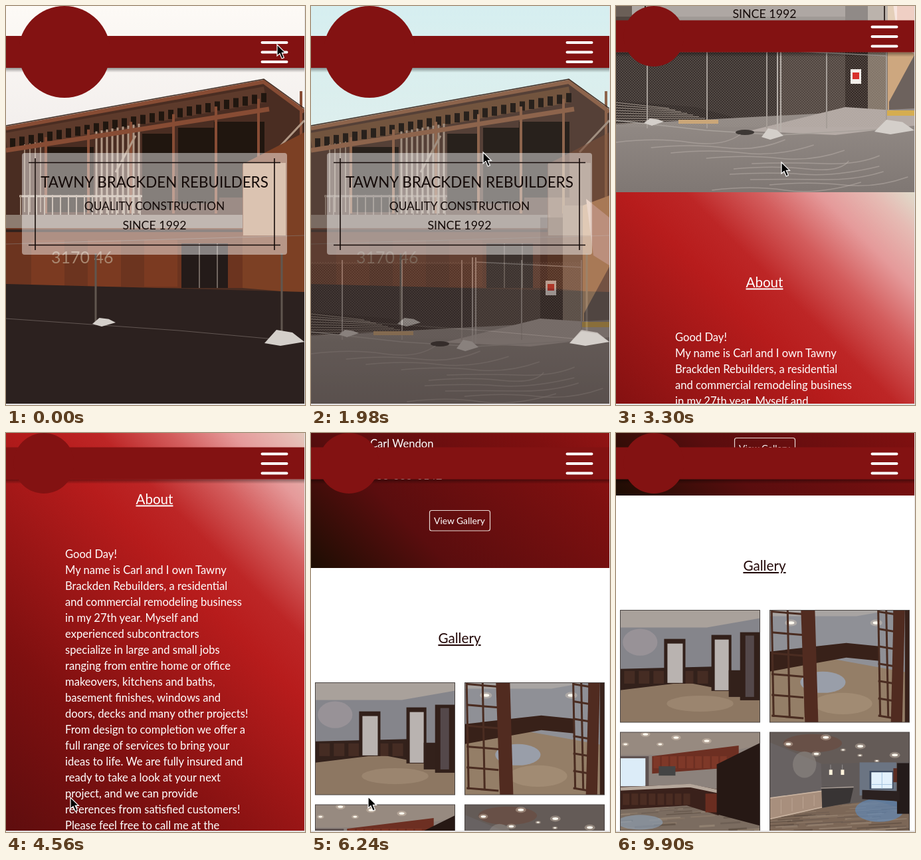
Recreate the animation shown at these times as an HTML page. Size 450x600 px, loop 9.96 s.

```html
<!DOCTYPE html>
<html lang="en">
<head>
<meta charset="utf-8">
<title>Builder site walkthrough</title>
<style>
html, body { margin: 0; width: 100%; height: 100%; overflow: hidden; background: #fff; }
svg { display: block; width: 450px; height: 600px; }
text { font-family: Lato, "Open Sans", sans-serif; }
.mid { text-anchor: middle; }
.u { text-decoration: underline; }
</style>
</head>
<body>
<svg id="stage" viewBox="0 0 450 600" xmlns="http://www.w3.org/2000/svg"></svg>
<script>
const LOOP = 9960, HERO = 598, ABOUT = 885;
const RED = '#831212', INK = '#140a08';

// Markup helpers
const rect = (x, y, w, h, fill, more = '') =>
  `<rect x="${x}" y="${y}" width="${w}" height="${h}" fill="${fill}" ${more}/>`;
const poly = (pts, fill) => `<polygon points="${pts}" fill="${fill}"/>`;
const line = (d, stroke, w = 1, more = '') =>
  `<path d="${d}" fill="none" stroke="${stroke}" stroke-width="${w}" ${more}/>`;
const oval = (x, y, rx, ry, fill, alpha = 1) =>
  `<ellipse cx="${x}" cy="${y}" rx="${rx}" ry="${ry}" fill="${fill}" opacity="${alpha}"/>`;
const label = (x, y, size, fill, str, cls = '') =>
  `<text x="${x}" y="${y}" font-size="${size}" fill="${fill}" class="${cls}">${str}</text>`;
const stop = ([at, color, alpha = 1]) =>
  `<stop offset="${at}" stop-color="${color}" stop-opacity="${alpha}"/>`;
const fade = (id, ...stops) =>
  `<linearGradient id="${id}" x2="0" y2="1">${stops.map(stop).join('')}</linearGradient>`;
const each = (n, fn) => Array.from({ length: n }, (_, i) => fn(i)).join('');

function random(seed) {
  return () => (seed = (seed * 16807) % 2147483647) / 2147483647;
}

// Building front shared by both hero photos
const roofY = x => 183 - x * .18;
const upright = (x, top, bottom, color, w) => line(`M${x} ${roofY(x) + top}V${bottom}`, color, w);

function house(c) {
  return rect(0, 0, 450, HERO, c.sky) +
    poly('0,183 388,113 449,158 449,440 0,440', c.wall) +
    rect(62, 212, 70, 98, c.hole) +
    each(3, i => rect(205 + i * 54, 192 - i * 9, 48 + i * 14, 114, c.hole)) +
    line('M0 203L390 133', c.trim, 24) +
    each(28, i => rect(6 + i * 14, roofY(6 + i * 14) + 17, 8, 14, c.hole)) +
    each(9, i => upright(136 + i * 8, 30, 312, c.stud, 3)) +
    each(5, i => upright(28 + i * 8, 30, 310, c.stud, 1.5)) +
    each(7, i => upright(60 + i * 64, 25, 312, c.beam, 4)) +
    line('M0 217L396 155', c.beam, 7) +
    line('M165 250L195 195M404 220L449 172', c.stud, 3) +
    line('M0 184L388 114L449 159', c.beam, 6) +
    line('M0 180L388 110L449 154', '#3b2a22', 1.5) +
    rect(0, 314, 360, 20, c.band);
}

// Lumpy sandbag standing at (x, y)
const bag = (x, y, w, h) =>
  poly(`${x},${y} ${x + w * .3},${y - h} ${x + w * .7},${y - h * .8} ${x + w},${y - 2} ${x + w * .4},${y + 4}`, '#d4cfca');

function framePhoto() {
  return house({ sky: 'url(#skyA)', wall: '#4a2d22', trim: '#5d3a2b', hole: '#20160f',
      stud: '#b19885', beam: '#874c34', band: '#8d7c70' }) +
    line('M20 286H205', '#c0ad9d', 3) + each(16, i => line(`M${22 + i * 12} 284V314`, '#ab9686', 2)) +
    rect(0, 334, 360, 90, '#6c341f') + line('M0 338H360', '#33221d', 4) +
    each(3, i => rect(38 + i * 85, 352, 50, 70, '#7b3a21')) +
    poly('356,238 449,190 449,432 356,424', '#7c4024') + rect(357, 236, 64, 109, '#bd9270') +
    rect(264, 357, 70, 67, '#241b19') + line('M291 357V424M318 357V424', '#8a8078', 1.5) +
    label(68, 387, 25, '#a98770', '3170 46') +
    poly('0,418 449,430 449,598 0,598', '#2c211f') +
    line('M0 470L260 488L449 505M0 358L449 345', '#857a75', 1, 'opacity=".6"') +
    line('M135 372V476M415 372V500', '#60564f', 3) +
    bag(130, 478, 35, 9) + bag(389, 507, 60, 20);
}

function donePhoto() {
  const rnd = random(7);
  return house({ sky: 'url(#skyB)', wall: '#5f5149', trim: '#83694f', hole: '#302a28',
      stud: '#94887d', beam: '#927960', band: '#6b5f57' }) +
    rect(0, 334, 345, 166, '#514640') + rect(0, 388, 245, 110, '#3a312e') +
    poly('0,460 120,470 180,486 100,496 0,494', '#302825') +
    each(9, i => line(`M0 ${463 + i * 4}L${80 + i * 9} ${472 + i * 2.5}`, '#a1958b', 1)) +
    rect(345, 318, 34, 155, '#342925') + rect(379, 300, 30, 175, '#837568') +
    poly('409,300 449,285 449,480 409,480', '#cda77f') + poly('414,290 449,318 449,390 425,375', '#efcfc4') +
    poly('411,462 449,392 449,476 411,476', '#6d625d') +
    poly('0,496 449,472 449,598 0,598', 'url(#road)') +
    poly('200,506 345,470 449,477 449,498 330,512', '#b5aba6') +
    rect(407, 475, 42, 8, '#d5ad50') + rect(0, 385, 407, 115, 'url(#mesh)') +
    each(5, i => line(`M${47 + i * 90} 382V502`, '#a59d97', 2)) +
    line('M243 378V508M248 378V508', '#b8b1ab', 2) +
    line('M248 385L408 393M0 490L136 505L245 512L408 503', '#a9a29c', 1.5) +
    rect(353, 413, 16, 22, '#f3eeea') + rect(356, 418, 10, 10, '#d8312c') +
    rect(94, 489, 60, 6, '#caa678') + bag(42, 494, 30, 7) + bag(219, 515, 33, 13) + bag(389, 507, 60, 18) +
    oval(194, 508, 14, 4, '#3d3835') +
    each(10, i => {
      const x = rnd() * 250, y = 515 + i * 8;
      return line(`M${x} ${y + 8}q60 ${-8 * rnd()} 110 0t${60 + 60 * rnd()} -12`, '#bcb2ac', 1.5, 'opacity=".5"');
    });
}

// Interior photos
const room = (wall, ceil, floor, top, low) => rect(0, 0, 210, 168, wall) +
  poly(`0,0 210,0 210,${top - 14} 130,${top} 0,${top}`, ceil) +
  poly(`0,${low + 4} 100,${low} 210,${low + 20} 210,168 0,168`, floor);
const lampRow = (n, x, y, dx, dy, r) => each(n, i =>
  oval(x + i * dx, y + i * dy, r * 1.8, r, '#e8d8c4', .35) + oval(x + i * dx, y + i * dy, r, r * .45, '#fffaf0'));
const cells = (n, x, y, dx, w, h, fill) => each(n, i => rect(x + i * dx, y, w, h, fill));

// Random floor boards, longer and thicker towards the viewer
function boards(w, top, bottom, n) {
  const rnd = random(97), tones = ['#94806d', '#54453b', '#a3917f', '#65574e'];
  return each(n, i => {
    const k = (i / n) ** 1.5, len = w * (.1 + .16 * rnd());
    return line(`M${w * (rnd() - .1)} ${top + (bottom - top) * k}l${len} ${-len * .06}`,
      tones[i % 4], 1 + 4 * k, 'opacity=".55"');
  });
}

const doorway = (x, y, w, h) => rect(x, y, w, h, '#32201a') + rect(x + 5, y + 7, w - 9, h - 8, '#b9b3b0');
const hall = () => room('#85858b', '#a9a19b', '#8d7762', 26, 106) +
  oval(30, 48, 26, 20, '#a59ca0', .6) + oval(120, 140, 50, 12, '#a58f78', .6) +
  poly('0,88 160,84 160,120 98,108 0,120', '#33211b') + cells(6, 6, 91, 22, 16, 19, '#452c23') +
  doorway(66, 43, 32, 67) + doorway(137, 37, 30, 84) +
  rect(163, 90, 18, 40, '#33211b') + rect(180, 33, 30, 102, '#32201a') + rect(188, 38, 13, 92, '#54484a');

const panes = (x, w, rows) =>
  each(rows + 1, i => line(`M${x} ${2 + i * 156 / rows}l${w} 4`, '#4a2c21', 3)) +
  each(3, i => line(`M${x + i * w / 2} 0l3 160`, '#4a2c21', 3));
const doors = () => room('#8f9096', '#a8a4a2', '#947e67', 9, 74) +
  oval(80, 108, 34, 16, '#9aa4b6', .85) + oval(110, 140, 44, 16, '#a18b73') +
  poly('0,62 115,49 165,54 165,76 115,71 0,92', '#382119') + lampRow(2, 32, 19, 128, 0, 5) +
  panes(3, 48, 5) + poly('47,0 68,0 73,168 53,168', '#512b20') +
  panes(163, 24, 6) + poly('186,0 203,0 199,168 182,168', '#502b20') + rect(203, 0, 7, 168, '#39221b');

const kitchen = () => room('#8c827c', '#978a80', '#7b6c60', 34, 110) + boards(210, 114, 166, 40) +
  lampRow(3, 38, 3, 46, 5, 4) + lampRow(2, 8, 18, 52, 0, 3) +
  rect(0, 36, 43, 48, '#5d5150') + rect(0, 39, 38, 42, '#dcecf8') +
  poly('48,36 178,20 178,52 48,62', '#6d2f22') + cells(9, 50, 36, 12.5, 10, 18, '#7e3828') +
  rect(58, 51, 25, 14, '#444') + poly('0,82 105,78 148,86 148,125 100,110 0,116', '#3a211b') +
  line('M0 85L105 80L148 89', '#b5a79b', 5) + cells(8, 4, 92, 13, 10, 17, '#4a2c22') +
  rect(128, 92, 18, 28, '#6a2d20') + oval(30, 135, 34, 11, '#90a5bd', .6) +
  poly('145,48 210,16 210,140 145,123', '#261814');

const basement = () => rect(0, 0, 407, 305, '#605a59') +
  poly('0,0 407,0 407,80 153,86 0,24', '#645b57') + oval(130, 30, 80, 25, '#6d4638', .5) +
  poly('0,22 153,85 156,190 0,215', '#686262') + oval(108, 88, 32, 36, '#9b948e', .45) +
  rect(258, 82, 100, 90, '#6b7482') + rect(285, 105, 65, 50, '#3e4c62') +
  rect(290, 109, 57, 44, '#e3f1fc') + line('M319 109V153M290 142H347', '#a9c6e0', 2) +
  poly('0,238 156,203 300,186 407,218 407,305 0,305', '#7c6757') + boards(407, 196, 300, 110) +
  oval(312, 212, 66, 32, '#5f8fc6', .6) +
  rect(350, 98, 17, 38, '#5b2c22') + rect(360, 84, 47, 138, '#241b1a') +
  poly('0,180 156,159 156,205 0,240', '#a88f7d') + line('M0 181L156 160M0 239L156 204', '#c9b3a0', 3) +
  each(5, i => line(`M${14 + i * 30} ${187 - i * 4}v${42 - i * 3}`, '#c1aa97', 1.5)) +
  poly('154,150 242,148 232,192 156,206', '#383434') + line('M153 152L242 149', '#a79c94', 3) +
  poly('265,157 367,160 367,188 265,182', '#2b2120') +
  each(2, i => line(`M${179 + i * 32} 88V103`, '#bbb') + rect(175 + i * 32, 102, 9, 14, '#fff3dc')) +
  lampRow(3, 166, 14, 94, 24, 8) + lampRow(2, 64, 32, 76, 27, 7) + lampRow(3, 213, 48, 46, 15, 4);

const symbol = (id, w, h, body) =>
  `<symbol id="${id}" viewBox="0 0 ${w} ${h}" preserveAspectRatio="xMidYMid slice">${body}</symbol>`;
const photo = (id, x, y, w, h, more = '') =>
  `<use href="#${id}" x="${x}" y="${y}" width="${w}" height="${h}" ${more}/>`;

const about = `Good Day!
My name is Carl and I own Tawny
Brackden Rebuilders, a residential
and commercial remodeling business
in my 27th year. Myself and
experienced subcontractors
specialize in large and small jobs
ranging from entire home or office
makeovers, kitchens and baths,
basement finishes, windows and
doors, decks and many other projects!
From design to completion we offer a
full range of services to bring your
ideas to life. We are fully insured and
ready to take a look at your next
project, and we can provide
references from satisfied customers!
Please feel free to call me at the
number below with any questions.

Carl Wendon

555-555-0142`.split('\n');

// 45 degree gradient across the About section, from its top right corner
const reach = (450 + ABOUT) / 2;
const redStops = [[0, '#e0dccb'], [.05, '#e6bab3'], [.11, '#e59a9a'], [.18, '#d35c5c'], [.26, '#bd2626'],
  [.33, '#b71c1c'], [.6, '#7f1010'], [.84, '#5a0d0e'], [1, '#1c0d03']];

const defs = '<defs>' +
  fade('skyA', [0, '#fdfaf6'], [.3, '#f3efed']) + fade('skyB', [0, '#b8e6ec'], [.3, '#ccefee']) +
  fade('road', [0, '#958d88'], [1, '#7f7773']) + fade('shade', [0, '#000', .4], [1, '#000', 0]) +
  `<linearGradient id="red" gradientUnits="userSpaceOnUse" x1="450" y1="${HERO}" x2="${450 - reach}" y2="${HERO + reach}">` +
  redStops.map(stop).join('') + '</linearGradient>' +
  '<pattern id="mesh" width="4" height="4" patternUnits="userSpaceOnUse">' +
  line('M0 0L4 4M4 0L0 4', '#a59c95', .5, 'opacity=".5"') + '</pattern>' +
  symbol('hall', 210, 168, hall()) + symbol('doors', 210, 168, doors()) +
  symbol('kitchen', 210, 168, kitchen()) + symbol('basement', 407, 305, basement()) + '</defs>';

const card = rect(24, 221, 399, 153, '#fff', 'rx="4" fill-opacity=".45"') +
  line('M34 235.5H413M34 359.5H413M44 229V367M404 229V367', INK, 1.6) +
  label(223.5, 273, 22.4, INK, 'TAWNY BRACKDEN REBUILDERS', 'mid') +
  label(223.5, 306.5, 17.3, INK, 'QUALITY CONSTRUCTION', 'mid') +
  label(223.5, 335.5, 17.8, INK, 'SINCE 1992', 'mid');

const thumbs = ['hall', 'doors', 'kitchen', 'basement'].map((id, i) => {
  const x = 6.5 + (i % 2) * 225, y = 1655.5 + (i >> 1) * 183.5;
  return photo(id, x, y, 210, 168.5) + rect(x, y, 210, 168.5, 'none', 'stroke="#4a4442"');
}).join('');

const page = rect(0, 0, 450, 2100, '#fff') + framePhoto() + `<g id="next">${donePhoto()}</g>` + card +
  rect(0, HERO, 450, ABOUT, 'url(#red)') +
  label(223.5, 740.5, 20.6, '#fff', 'About', 'mid u') +
  about.map((s, i) => label(89, 822 + i * 24, 16.6, '#fff', s)).join('') +
  rect(178.5, 1396.5, 91, 30.5, 'none', 'rx="3" stroke="#e8d9d4" stroke-width="1.2"') +
  label(223.5, 1416.5, 13.8, '#fff', 'View Gallery', 'mid') +
  label(223.5, 1596, 20.7, '#220606', 'Gallery', 'mid u') + thumbs;

const round = 'stroke-linecap="round" stroke-linejoin="round"';
const lightbox = rect(0, 0, 450, 600, '#fff', 'fill-opacity=".7"') +
  photo('kitchen', 21, 185, 407, 305) + photo('basement', 21, 185, 407, 305, 'id="shot"') +
  [22, 389.5].map(x => rect(x, 185, 38, 305, '#fff', 'fill-opacity=".42"')).join('') +
  rect(389.5, 186, 38, 37, '#fff', 'fill-opacity=".55"') +
  rect(21.5, 185.5, 406, 304.5, 'none', 'stroke="#111"') +
  line('M49 321.5l-16 16l16 16M401 321.5l16 16l-16 16', '#000', 4.5, round) +
  line('M395 192l27 27m0 -27l-27 27', '#000', 3, round);

const stage = document.getElementById('stage');
stage.innerHTML = defs + `<g id="page">${page}</g>` +
  `<g id="bar">${rect(0, 48, 450, 7, 'url(#shade)') + rect(0, 0, 450, 48, RED)}</g>` +
  `<circle id="badge" fill="${RED}"/><g id="box">${lightbox}</g>` +
  `<g id="menu">${line('M385.5 10h37m-37 14.5h37m-37 14.5h37', '#fff', 4, round)}</g>` +
  rect(449, 0, 1, 600, '#e6e4e4') + rect(0, 598, 450, 2, '#e4e2e2') +
  '<path id="cursor" d="M0 0V17L4 13.5L7.2 21L10.4 19.6L7.3 12.4H12.4Z" fill="#000" stroke="#fff" stroke-width="1.2"/>';

function set(id, attrs) {
  const el = document.getElementById(id);
  for (const name in attrs) el.setAttribute(name, attrs[name]);
}

const span = (t, a, b) => Math.max(0, Math.min(1, (t - a) / (b - a)));
const ease = v => v * v * (3 - 2 * v);
const mix = (a, b, k) => a + (b - a) * k;

// Each move: [start, end, ...place to reach]
const follow = (from, moves, t) => moves.reduce((at, [a, b, ...to]) =>
  at.map((v, i) => mix(v, to[i], ease(span(t, a, b)))), from);

const scrolls = [[2350, 3200, 318], [3500, 4350, 634], [4950, 6200, 1280], [6300, 6750, 1389]];
const moves = [[300, 1250, 259, 220], [2100, 3200, 249, 235], [3500, 4400, 97, 548], [5000, 6100, 86, 547],
  [7050, 7650, 412, 341], [8600, 9150, 409, 204], [9400, 9800, 465, 140]];

function draw(t) {
  const [scroll] = follow([0], scrolls, t);
  const small = ease(span(t, 2550, 2850));
  const r = mix(69, 45.5, small);
  const transform = `translate(0 ${mix(45, 21.5, small)})`;
  const open = span(t, 7020, 7220) - span(t, 9320, 9520);
  set('page', { transform: `translate(0 ${-scroll})` });
  set('next', { opacity: span(t, 1430, 2430) });
  set('bar', { transform });
  set('menu', { transform });
  set('badge', { cx: mix(88, 57, small), cy: r, r });
  set('box', { opacity: open });
  set('shot', { opacity: t < 7800 ? 0 : 1 });
  set('cursor', { transform: `translate(${follow([408, 58], moves, t)})` });
}

const start = performance.now();
function tick() {
  draw((performance.now() - start) % LOOP);
  requestAnimationFrame(tick);
}
tick();
</script>
</body>
</html>
```
